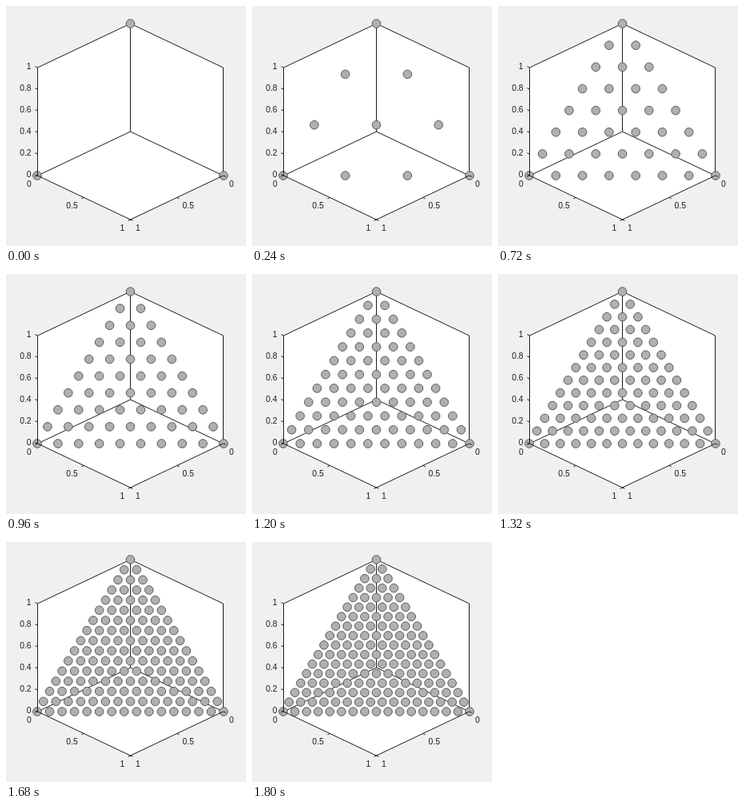
Write an HTML page that moves like this. It is 300 px wide and 300 px high and loops after 1.92 s.

```html
<!DOCTYPE html>
<html lang="en">
<head>
<meta charset="utf-8">
<title>Simplex grid</title>
<style>
html, body { margin: 0; width: 100%; height: 100%; overflow: hidden; background: #f0f0f0; }
svg { display: block; width: 100vw; height: 100vh; }
.line { fill: none; stroke: #1c1c1c; stroke-width: 1; }
#dots { fill: #b0b0b0; stroke: #595959; stroke-width: 1; }
text { font: 10.4px "Liberation Sans", Arial, sans-serif; fill: #1c1c1c; }
</style>
</head>
<body>
<svg viewBox="0 0 300 300">
  <path fill="#fff" d="M39 77L155.5 22L272 77V212L155.5 267L39 212Z"/>
  <path class="line" d="M39.5 77L155.5 22L271.5 77V212L155.5 157L39.5 212M155.5 22V157"/>
  <g id="dots"></g>
  <path class="line" d="M39.5 77V212L155.5 267L271.5 212"/>
  <path class="line" id="ticks"/>
  <g id="labels"></g>
</svg>
<script>
const NS = 'http://www.w3.org/2000/svg';
const STEP = 120, STEPS = 16;
const LEFT = 39, RIGHT = 272, TOP = 22, BASE = 212, RADIUS = 5.3;
const dots = document.getElementById('dots');
const labels = document.getElementById('labels');

function add(parent, tag, attrs) {
  const el = document.createElementNS(NS, tag);
  for (const key in attrs) el.setAttribute(key, attrs[key]);
  return parent.appendChild(el);
}

function label(str, x, y, anchor = 'middle') {
  add(labels, 'text', { x, y, 'text-anchor': anchor }).textContent = str;
}

let ticks = '';
for (let i = 0; i <= 5; i++) {
  const y = BASE - 27 * i;
  ticks += `M39.5 ${y}l-3 -1.3`;
  label(String(i / 5), 31.6, y + 1.7, 'end');
}
for (let i = 0; i <= 2; i++) {
  const dx = 58.25 * i, y = BASE + 27.5 * i;
  ticks += `M${LEFT + dx} ${y}l-2.8 1.3M${RIGHT - dx} ${y}l2.8 1.3`;
  label(String(i / 2), [28.8, 82.6, 145.5][i], y + 13.8);
  label(String(i / 2), [282, 227.8, 164.8][i], y + 13.8);
}
document.getElementById('ticks').setAttribute('d', ticks);

// Triangular lattice with n intervals along each side
function drawGrid(n) {
  dots.replaceChildren();
  const dx = (RIGHT - LEFT) / n, dy = (BASE - TOP) / n;
  for (let row = 0; row <= n; row++) {
    for (let col = 0; col <= n - row; col++) {
      add(dots, 'circle', {
        cx: LEFT + dx * (col + row / 2),
        cy: BASE - dy * row,
        r: RADIUS
      });
    }
  }
}

let shown = 0;
const start = performance.now();
function tick() {
  const n = Math.floor((performance.now() - start) / STEP) % STEPS + 1;
  if (n !== shown) drawGrid(shown = n);
  requestAnimationFrame(tick);
}
tick();
</script>
</body>
</html>
```
